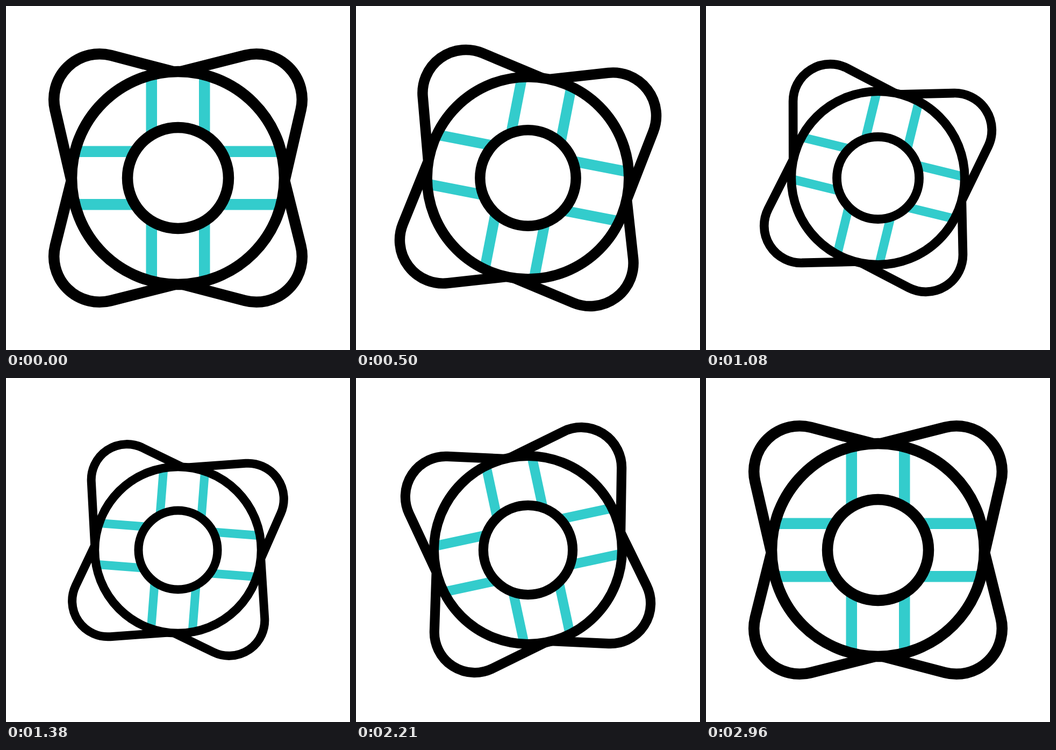
An HTML page that plays this animation: 640x640 px, repeating every 3 s.

```html
<!DOCTYPE html>
<html lang="en">
<head>
<meta charset="utf-8">
<title>Lifebuoy</title>
<style>
  html, body { margin: 0; width: 100%; height: 100%; overflow: hidden; background: #fff; }
  svg { display: block; width: 100%; height: 100%; }
</style>
</head>
<body>
<svg viewBox="-320 -320 640 640">
  <g id="buoy" fill="none" stroke="#000" stroke-width="20.5">
    <path id="rope" stroke-linejoin="bevel"/>
    <circle r="197" fill="#fff" stroke="none"/>
    <g id="bands" stroke="#3cc"></g>
    <circle r="198"/>
    <circle r="94"/>
  </g>
</svg>
<script>
const LOOP = 3000, FPS = 24, LAST = 71;
const ARC_OFFSET = 146, ARC_RADIUS = 84.8;

// Keys are [step, value], eased in and out between neighbours.
const SCALE = [[0, 1], [36, 0.779], [LAST, 1]];
const BAND_TURN = [[0, 0], [19.5, 15.9], [20.5, 15.9], [49, -13], [LAST, 0]];
const ARC_TURN = [[0, 0], [20, 13.2], [24.5, 13.2], [54.5, -12.2], [LAST, 0]];

// Where the rope meets the ring: left, top, right, bottom.
const HITCHES = [[-198.2, 5], [-2, -196], [198.2, 5], [2, 196]];
const ARCS = [[-1, -1], [1, -1], [1, 1], [-1, 1]].map(p => p.map(v => v * ARC_OFFSET));

const buoy = document.getElementById('buoy');
const rope = document.getElementById('rope');
const bands = document.getElementById('bands');

bands.innerHTML = [0, 90, 180, 270].map(a =>
  `<path transform="rotate(${a})" d="M-49.25-191.8V-80M49.25-191.8V-80"/>`).join('');

// Equivalent of cubic-bezier(.42, 0, .58, 1)
function easeInOut(x) {
  let lo = 0, hi = 1;
  for (let i = 0; i < 24; i++) {
    const t = (lo + hi) / 2;
    if (1.26 * t - 0.78 * t * t + 0.52 * t ** 3 < x) lo = t; else hi = t;
  }
  return lo * lo * (3 - 2 * lo);
}

function valueAt(keys, step) {
  const i = Math.max(1, keys.findIndex(key => key[0] >= step));
  const [s0, v0] = keys[i - 1], [s1, v1] = keys[i];
  return v0 + (v1 - v0) * easeInOut((step - s0) / (s1 - s0));
}

function rotate([x, y], degrees) {
  const a = degrees * Math.PI / 180, c = Math.cos(a), s = Math.sin(a);
  return [x * c - y * s, x * s + y * c];
}

// Point where the line from a hitch touches an arc's circle.
function tangent([px, py], [cx, cy], side) {
  const dx = px - cx, dy = py - cy;
  const a = Math.atan2(dy, dx) + side * Math.acos(ARC_RADIUS / Math.hypot(dx, dy));
  return [cx + ARC_RADIUS * Math.cos(a), cy + ARC_RADIUS * Math.sin(a)];
}

function ropePath(bandTurn, arcTurn) {
  const hitches = HITCHES.map(p => rotate(p, bandTurn));
  const segments = ARCS.map((p, i) => {
    const center = rotate(p, arcTurn);
    const next = hitches[(i + 1) % 4];
    const from = tangent(hitches[i], center, 1);
    const to = tangent(next, center, -1);
    return `L${from}A${ARC_RADIUS} ${ARC_RADIUS} 0 0 1 ${to}L${next}`;
  });
  return `M${hitches[0]}${segments.join('')}Z`;
}

function render(time) {
  const step = Math.min(LAST, Math.floor(time % LOOP * FPS / 1000 + 0.1));
  const bandTurn = valueAt(BAND_TURN, step);
  buoy.setAttribute('transform', `scale(${valueAt(SCALE, step)})`);
  bands.setAttribute('transform', `rotate(${bandTurn})`);
  rope.setAttribute('d', ropePath(bandTurn, valueAt(ARC_TURN, step)));
}

const start = performance.now();
function tick() {
  render(performance.now() - start);
  requestAnimationFrame(tick);
}
tick();
</script>
</body>
</html>
```
